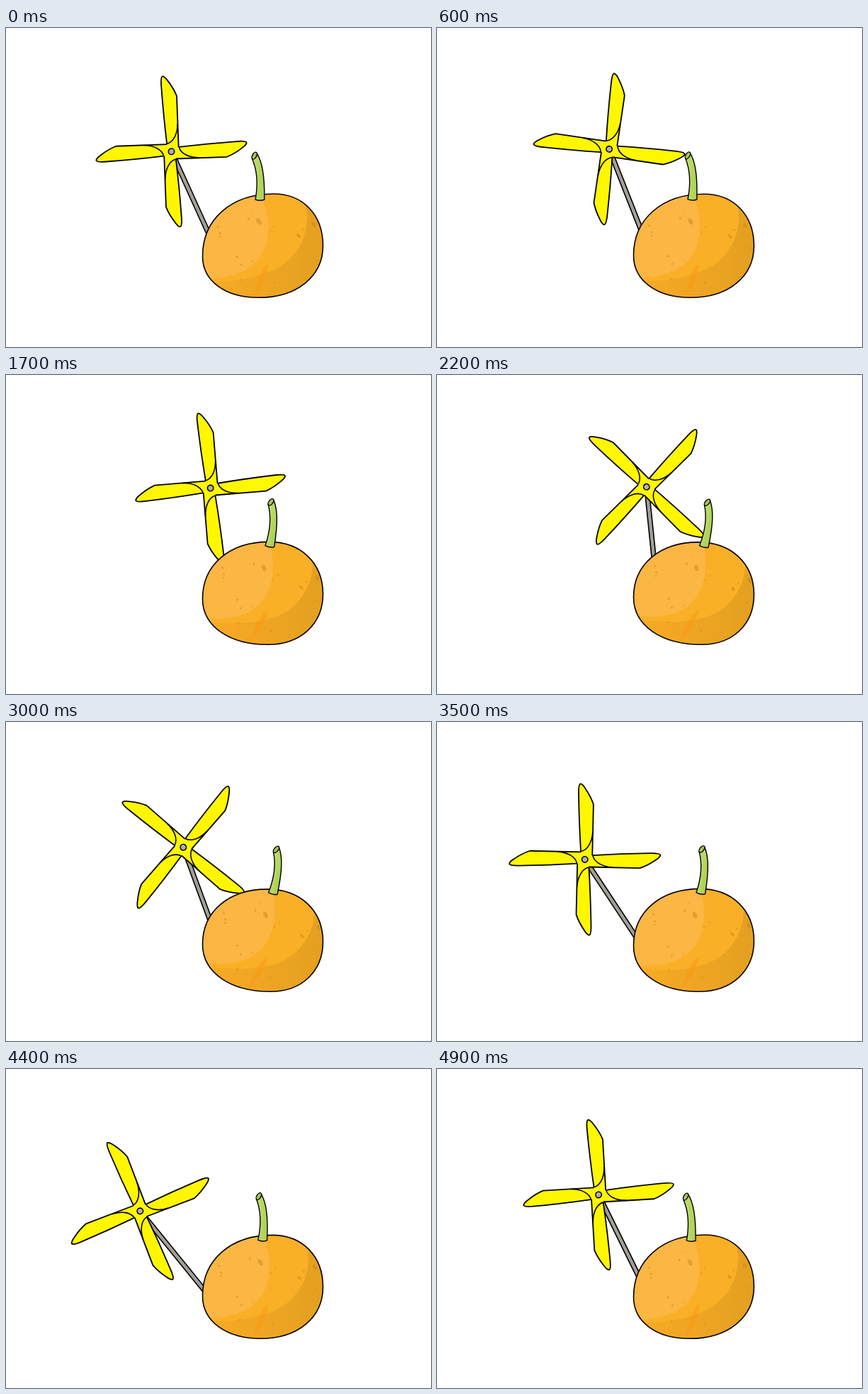
An HTML page with a canvas for the animation above (5000 ms loop, 600 by 450 pixels).

```html
<!DOCTYPE html>
<html>
<head>
<meta charset="utf-8">
<title>Pinwheel and orange</title>
<style>
html, body { margin: 0; width: 100%; height: 100%; overflow: hidden; background: #fff; }
canvas { display: block; width: 600px; height: 450px; }
</style>
</head>
<body>
<canvas id="stage" width="600" height="450"></canvas>
<script>
const ctx = document.getElementById('stage').getContext('2d');
const LOOP = 5000, STEP = 100, START = 100;
const TAU = 2 * Math.PI, RAD = Math.PI / 180;

// Turning points of the pinwheel hub
const MID = [236.5, 172.5], RIGHT = [296.2, 157.7], LEFT = [180.5, 205.6];
const ROD_FOOT = [316.5, 357];

const clamp = u => Math.min(1, Math.max(0, u));
const ease = u => u * u * (3 - 2 * u);
const mix = (a, b, k) => a.map((v, i) => v + (b[i] - v) * k);

// Eases to a stop at both sides, but passes the middle with some speed
function hubAt(t) {
  if (t < 2130) return mix(MID, RIGHT, ease(clamp((t - 200) / 1930)));
  if (t < 4150) return mix(RIGHT, LEFT, ease((t - 2130) / 2020));
  const u = (t - 4150) / 950;
  return mix(LEFT, MID, ease(u) + 0.27 * u * u * (u - 1));
}

function swayAt(t) {
  const u = (t - START) / (LOOP / 2);
  return ease(u < 1 ? u : 2 - u);
}

function paint(path, fill, width) {
  if (fill) {
    ctx.fillStyle = fill;
    ctx.fill(path);
  }
  if (width) {
    ctx.lineWidth = width;
    ctx.strokeStyle = '#000';
    ctx.stroke(path);
  }
}

function turn(x, y, angle) {
  ctx.translate(x, y);
  ctx.rotate(angle);
  ctx.translate(-x, -y);
}

function oval(x, y, rx, ry = rx, angle = 0) {
  const p = new Path2D();
  p.ellipse(x, y, rx, ry, angle, 0, TAU);
  return p;
}

function fade(x0, c0, x1, c1) {
  const g = ctx.createLinearGradient(x0, 0, x1, 0);
  g.addColorStop(0, c0);
  g.addColorStop(1, c1);
  return g;
}

const edge = 'M-6 -11Q-9.5 -50 -11.3 -92Q-12 -106 -9 -106.5Q-6 -106 -2 -100Q6 -89 10 -78L10.4 -6';
const bladeEdge = new Path2D(edge);
const blade = new Path2D(edge + 'L0 0Z');
const crease = new Path2D('M10 -39C9.5 -24 3 -13 -6 -11');

const middle = new Path2D('M412 225C441 270 418 325 376 342C345 355 310 360 260 360L260 220Z');
const shine = new Path2D('M354 225C380 270 375 320 340 340C319 352 300 354 262 356L260 220Z');
const streak = new Path2D('M371 330C358 342 356 360 351 378C362 368 369 350 371 330Z');
const stem = new Path2D('M352 242C355.5 222 355.5 203 347.2 184L353.5 176C361 188 365 205 364.8 242Q359 244.5 352 242Z');
const mouth = oval(350.5, 180.2, 5.4, 2.9, -62 * RAD);

const bodyShade = fade(290, '#f8aa25', 440, '#e5a021');
const stemShade = fade(351, '#bfdc6c', 366, '#a6cd50');

function makeSpots(count) {
  let seed = 7;
  const random = () => (seed = seed * 16807 % 2147483647) / 2147483647;
  const spots = [oval(357, 273, 5, 3, 1), oval(434, 277, 4, 2.4, 1), oval(413, 293, 3.4, 2, 0.7)];
  for (let i = 0; i < count; i++) {
    const a = random() * TAU, d = Math.sqrt(random()), r = 1 + random();
    spots.push(oval(363 + 76 * d * Math.cos(a), 308 + 62 * d * Math.sin(a), r, r * 0.7, a));
  }
  return spots;
}
const spots = makeSpots(14);

// Quarter curves between the four extreme points, which slide as the body rolls
function bodyAt(sway) {
  const top = [378 - 10 * sway, 234 + 2 * sway];
  const right = [447.5, 307 + 3 * sway];
  const bottom = [356 + 19 * sway, 380.3];
  const left = [277.5, 322 - 9 * sway];
  const p = new Path2D();
  p.moveTo(...top);
  [top, right, bottom, left].forEach((a, i, all) => {
    const b = all[(i + 1) % 4];
    const corner = i % 2 ? [a[0], b[1]] : [b[0], a[1]];
    p.bezierCurveTo(...mix(a, corner, 0.595), ...mix(b, corner, 0.595), ...b);
  });
  p.closePath();
  return p;
}

function drawRod(hub) {
  const rod = new Path2D();
  rod.moveTo(...hub);
  rod.lineTo(...ROD_FOOT);
  paint(rod, null, 7.6);
  ctx.strokeStyle = '#a39e97';
  ctx.lineWidth = 4.4;
  ctx.stroke(rod);
}

function drawFan([x, y], angle) {
  const quarters = draw => {
    for (let i = 0; i < 4; i++) {
      draw();
      ctx.rotate(TAU / 4);
    }
  };
  ctx.save();
  ctx.translate(x, y);
  ctx.rotate(angle);
  quarters(() => paint(blade, '#fff700'));
  paint(oval(0, 0, 11), '#fff700');
  quarters(() => {
    paint(bladeEdge, null, 1.8);
    paint(crease, null, 1.6);
  });
  paint(oval(0, 0, 4.2), '#b4b0ac', 1.6);
  ctx.restore();
}

function drawOrange(sway) {
  const body = bodyAt(sway);
  ctx.save();
  ctx.clip(body);
  paint(body, bodyShade);
  turn(366, 325, sway * 11 * RAD);
  paint(middle, '#f9b026');
  paint(shine, '#fbb644');
  paint(streak, 'rgba(250,150,20,.45)');
  for (const spot of spots) paint(spot, 'rgba(190,125,20,.4)');
  ctx.restore();
  paint(body, null, 1.6);

  ctx.save();
  turn(368, 333, sway * 12.4 * RAD);
  paint(stem, stemShade, 1.4);
  paint(mouth, '#a9c455', 1.4);
  ctx.restore();
}

function frame() {
  const clock = Math.floor(performance.now() / STEP) * STEP % LOOP;
  const t = clock < START ? clock + LOOP : clock;
  const hub = hubAt(t);
  ctx.fillStyle = '#fff';
  ctx.fillRect(0, 0, 600, 450);
  ctx.lineJoin = 'round';
  drawRod(hub);
  drawFan(hub, TAU * ease((t - START) / LOOP) - 1.4 * RAD);
  drawOrange(swayAt(t));
  requestAnimationFrame(frame);
}
requestAnimationFrame(frame);
</script>
</body>
</html>
```
